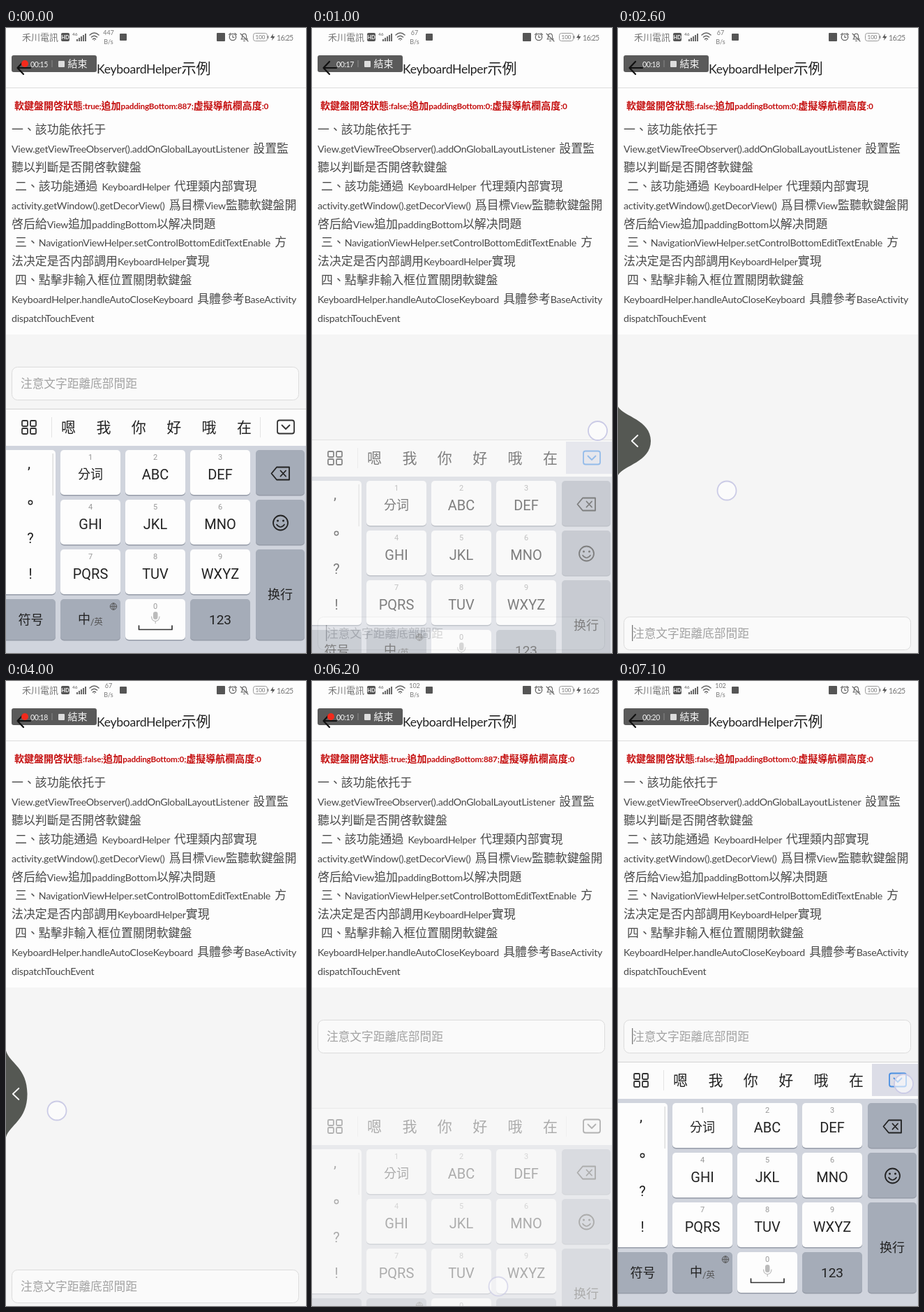
These frames come from a looping animation (430x893 px, 7200 ms). An HTML page:

```html
<!DOCTYPE html>
<html lang="zh-Hant">
<head>
<meta charset="utf-8">
<style>
  html, body { margin: 0; width: 100%; height: 100%; overflow: hidden; background: #f5f5f5; }
  svg { display: block; width: 430px; height: 893px; }
  text { font-family: Lato, "Noto Sans CJK TC", "Noto Sans CJK SC", "Noto Sans CJK JP", sans-serif; }
  .latin { font-size: .84em; letter-spacing: -.018em; word-spacing: .2em; }
  .key { font-family: Roboto, "Noto Sans CJK SC", "Noto Sans CJK JP", sans-serif; }
  .line { fill: none; stroke-linecap: round; stroke-linejoin: round; }
</style>
</head>
<body>
<svg id="stage" viewBox="0 0 430 893"></svg>
<script>
const LOOP = 7200, STEP = 100;
const INK = '#484848', GREY = '#777', KEY_GREY = '#a5acb8';

const text = (x, y, size, fill, content, attrs = '') =>
  `<text x="${x}" y="${y}" font-size="${size}" fill="${fill}" ${attrs}>${content}</text>`;
const centred = (x, y, size, fill, content, attrs = '') =>
  text(x, y + size * .36, size, fill, content, `text-anchor="middle" ${attrs}`);
const rect = (x, y, w, h, r, fill, attrs = '') =>
  `<rect x="${x}" y="${y}" width="${w}" height="${h}" rx="${r}" fill="${fill}" ${attrs}/>`;
const line = (d, stroke, width, attrs = '') =>
  `<path class="line" d="${d}" stroke="${stroke}" stroke-width="${width}" ${attrs}/>`;
const circle = (x, y, r, attrs) => `<circle cx="${x}" cy="${y}" r="${r}" ${attrs}/>`;
const mixed = s => s.replace(/[\x20-\x7e]+/g, '<tspan class="latin">$&</tspan>');

function statusBar() {
  const bars = [0, 1, 2, 3, 4].map(i => rect(101 + i * 3, 16 - i * 2, 2, 3 + i * 2, 0, '#666')).join('');
  return text(23, 18, 13, GREY, '禾川電訊')
    + rect(79, 7, 12, 12, 2, '#555') + centred(85, 13, 7.5, '#fff', 'HD', 'font-weight="700"')
    + text(95, 11, 6.5, '#555', '46') + bars
    + line('M120 10Q126.500 4 133 10M122.500 13Q126.500 9.500 130.500 13M124.500 16Q126.500 14 128.500 16', '#666', 1.6)
    + centred(126.5, 17.5, 3, '#666', '•')
    + `<text id="speed" x="147" y="10" font-size="9" fill="${GREY}" text-anchor="middle"></text>`
    + centred(147, 20, 9, GREY, 'B/s')
    + rect(163, 8, 10, 10, 1, '#555')
    + rect(302, 7, 12, 12, 1, '#555')
    + circle(325, 13, 4.7, 'fill="none" stroke="#666" stroke-width="1.300"')
    + line('M325 10.500V13.500H327M319.500 9.500L322 7.500M330.500 9.500L328 7.500', '#666', 1.2)
    + line('M337 16H346L344.500 14V11Q344 8 341.500 8T338.500 11V14ZM340.500 18.500H342.500M336 8L347 19', '#666', 1.1)
    + rect(354.5, 7.5, 20, 11, 3, 'none', 'stroke="#999"') + rect(375, 11, 1.5, 4, 0, '#999')
    + centred(364.5, 13, 8, GREY, '100')
    + '<path d="M383 8L379 14H382L381 18L385.500 12H382.500Z" fill="#555"/>'
    + text(388, 17.5, 10.5, GREY, '16:25', 'letter-spacing="-.7"');
}

function header() {
  return text(130, 65, 21, '#222', mixed('KeyboardHelper示例'))
    + rect(0, 85, 430, 1, 0, '#ddd')
    + rect(8, 39, 122, 24, 3, '#5a5a5a')
    + line('M35 57H17M25 48L16.500 57L25 66', '#111', 2.2, 'stroke-linecap="butt"')
    + circle(27, 51, 5, 'id="dot" fill="#f32a1c"')
    + '<text id="timer" x="35" y="55.500" font-size="10.500" fill="#f4f4f4" letter-spacing="-.4"></text>'
    + rect(65.5, 46, 1, 10, 0, '#888')
    + rect(75, 47, 9, 9, 1, '#ddd')
    + text(88.5, 56, 14, '#f4f4f4', '結束');
}

function article() {
  const lines = [
    '一、該功能依托于',
    'View.getViewTreeObserver().addOnGlobalLayoutListener 設置監',
    '聽以判斷是否開啓軟鍵盤',
    '二、該功能通過 KeyboardHelper 代理類内部實現',
    'activity.getWindow().getDecorView() 爲目標View監聽軟鍵盤開',
    '啓后給View追加paddingBottom以解决問題',
    '三、NavigationViewHelper.setControlBottomEditTextEnable 方',
    '法决定是否内部調用KeyboardHelper實現',
    '四、點擊非輸入框位置關閉軟鍵盤',
    'KeyboardHelper.handleAutoCloseKeyboard 具體參考BaseActivity',
    'dispatchTouchEvent'
  ];
  return '<text id="status" x="12" y="116" font-size="14" font-weight="700" fill="#c40d0d"></text>'
    + lines.map((s, i) =>
      text(/^[二三四]、/.test(s) ? 13 : 8, 151 + i * 26.9, 16.9, INK, mixed(s))).join('');
}

function field() {
  return '<g id="field">' + rect(8.5, 484.5, 411, 47, 8, '#fafafa', 'stroke="#dcdcdc"')
    + text(21, 514, 16.7, '#a2a2a2', '注意文字距離底部間距')
    + rect(20, 496, 1.3, 23, 0, '#777', 'id="cursor"') + '</g>';
}

function keyboard() {
  const label = (x, y, size, s, fill = '#222') => centred(x, y, size, fill, s, 'class="key"');
  const cap = (x, y, w, h, fill) =>
    rect(x, y + 1.5, w, h, 5, '#969ca8') + rect(x, y, w, h, 5, fill);
  const columns = [78, 171, 264], rows = [603, 674, 745];
  const names = ['分词', 'ABC', 'DEF', 'GHI', 'JKL', 'MNO', 'PQRS', 'TUV', 'WXYZ'];

  const bar = rect(0, 544, 430, 53, 0, '#fcfcfc') + rect(0, 544, 430, 1, 0, '#d4d4d4')
    + [23, 35].map(x => [561, 572].map(y =>
      rect(x, y, 8, 8, 1.5, 'none', 'stroke="#333" stroke-width="1.800"')).join('')).join('')
    + rect(65, 556, 1, 29, 0, '#e4e4e4') + rect(364, 556, 1, 29, 0, '#e4e4e4')
    + [...'嗯我你好哦在'].map((c, i) => centred(89.5 + i * 50.4, 570, 21, '#222', c)).join('')
    + rect(364, 547, 66, 46, 0, '#dcdde7', 'id="pressed"')
    + '<g id="collapse" stroke="#333">'
    + rect(389, 560.5, 24, 19, 3, 'none', 'stroke-width="1.800"')
    + '<path class="line" d="M395.500 567.500L401 573L406.500 567.500" stroke-width="1.800"/></g>';

  const letters = names.map((name, i) => {
    const x = columns[i % 3], y = rows[i / 3 | 0];
    return cap(x, y, 86, 64, '#fdfdfd') + label(x + 43, y + 10, 11, i + 1, '#999')
      + label(x + 43, y + 34.5, name === '分词' ? 18 : 20, name);
  }).join('');

  const punctuation = cap(-4, 603, 75, 206, '#fdfdfd') + rect(66.5, 608, 1.5, 60, 0, '#dedede')
    + text(31, 629, 21, '#222', ',', 'class="key"')
    + circle(35, 678, 2.7, 'fill="none" stroke="#222" stroke-width="1.400"')
    + label(35, 729, 20, '?') + label(35, 780, 20, '!');

  const side = cap(358, 603, 70, 64, KEY_GREY) + cap(358, 674, 70, 64, KEY_GREY)
    + cap(358, 745, 70, 129, KEY_GREY)
    + line('M380.500 636.500L388 627.500H406V645.500H388ZM393.500 632.500L401 640.500M401 632.500L393.500 640.500', '#222', 1.8)
    + circle(393.5, 707, 10.5, 'fill="none" stroke="#222" stroke-width="1.800"')
    + circle(389.5, 704, 1.5, 'fill="#222"') + circle(397.5, 704, 1.5, 'fill="#222"')
    + line('M388 709.500Q393.500 716.500 399 709.500', '#222', 1.7)
    + label(393, 810, 18, '换行');

  const bottom = cap(-4, 816, 75, 58, KEY_GREY) + label(35.5, 845.5, 18, '符号')
    + cap(78, 816, 86, 58, KEY_GREY) + label(112, 845, 18, '中') + label(130, 848, 12.5, '/英', '#555')
    + circle(154, 826.5, 4.7, 'fill="none" stroke="#555"')
    + line('M149.500 826.500H158.500M154 822V831M154 822Q149 826.500 154 831Q159 826.500 154 822', '#555', .8)
    + cap(171, 816, 86, 58, '#fdfdfd') + label(214, 826, 11, 0, '#999')
    + rect(211, 834, 6.5, 11, 3.2, '#bbb')
    + line('M208.500 841Q209 847.500 214.200 847.500T220 841M214.200 848V850.500', '#bbb', 1.2)
    + line('M190.500 854V859.500H238V854', '#333', 1.7)
    + cap(264, 816, 86, 58, KEY_GREY) + label(307, 845.5, 19, '123');

  return '<g id="keyboard">' + rect(0, 597, 430, 420, 0, '#d0d4dd')
    + bar + punctuation + letters + side + bottom + '</g>';
}

document.getElementById('stage').innerHTML =
  rect(0, 0, 430, 893, 0, '#f5f5f5') + rect(0, 0, 430, 438, 0, '#fdfdfd')
  + statusBar() + header() + article() + field() + keyboard()
  + '<g id="back"><path id="bulge" fill="#555853"/>'
  + line('', '#fff', 1.8, 'id="chevron"') + '</g>'
  + circle(0, 0, 13.5, 'id="touch" fill="#fff" fill-opacity=".6" stroke="#cbcbe6" stroke-width="1.800"');

const ui = {};
document.querySelectorAll('[id]').forEach(el => ui[el.id] = el);
const set = (el, attrs) => Object.entries(attrs).forEach(([k, v]) => el.setAttribute(k, v));
const show = (el, on) => set(el, { visibility: on ? 'visible' : 'hidden' });
const within = (t, ...spans) => spans.some(([a, b]) => t >= a && t < b);
const latest = (t, keys) => keys.filter(k => k[0] <= t).pop()[1];

// Linear interpolation through [time, value, ...] keys, held at both ends.
function track(t, keys) {
  const next = keys.findIndex(k => k[0] > t);
  if (next === 0) return keys[0].slice(1);
  if (next < 0) return keys[keys.length - 1].slice(1);
  const a = keys[next - 1], b = keys[next], p = (t - a[0]) / (b[0] - a[0]);
  return a.slice(1).map((v, i) => v + (b[i + 1] - v) * p);
}

const drag = [[1500, 2, 590], [2300, 160, 655], [2600, 156, 661], [4000, 73, 614], [5200, 5, 567]];
const fade = [[900, 1], [1000, .56], [1200, 0], [6000, 0], [6100, .06], [6200, .34], [6500, 1]];

function drawBack(x) {
  const w = 47 * Math.sin(Math.PI / 2 * Math.min(1, Math.max(0, (x - 5) / 151)));
  const h = 49 + (47 - w) * .78, cy = 590;
  const a = h * .71, b = h * .61;
  set(ui.bulge, {
    d: `M0 ${cy - h}C${w * .17} ${cy - a} ${w} ${cy - b} ${w} ${cy}`
      + `C${w} ${cy + b} ${w * .17} ${cy + a} 0 ${cy + h}Z`
  });
  const cx = w * .6 - 4.5;
  set(ui.chevron, { d: `M${cx + 4.5} ${cy - 8}L${cx - 4} ${cy}L${cx + 4.5} ${cy + 8}`, opacity: Math.min(1, w / 20) });
}

function draw(t) {
  const dragging = within(t, [1500, 5400]);
  const pressing = within(t, [700, 1400], [6900, LOOP]);
  const tapping = within(t, [5800, 6300]);
  const open = within(t, [0, 900], [6100, 7100]);
  const raised = within(t, [0, 1000], [6100, LOOP]);
  const recording = within(t, [0, 200], [500, 700], [1400, 2200], [3000, 4400], [5600, 6600]);

  ui.speed.textContent = latest(t, [[0, 447], [500, 67], [5800, 102]]);
  ui.timer.textContent = '00:' + latest(t, [[0, 15], [200, 16], [700, 17], [2200, 18], [4400, 19], [6600, 20]]);
  ui.status.innerHTML = mixed(`軟鍵盤開啓狀態:${open};追加paddingBottom:${open ? 887 : 0};虚擬導航欄高度:0`);
  show(ui.dot, recording);
  show(ui.cursor, !recording);
  set(ui.field, { transform: `translate(0 ${raised ? 0 : 357})` });

  const [alpha] = track(t, fade);
  set(ui.keyboard, { opacity: alpha, transform: `translate(0 ${100 * (1 - alpha)})` });
  show(ui.pressed, pressing);
  set(ui.collapse, { stroke: pressing ? '#4a90e2' : '#333' });

  const [x, y] = dragging ? track(t, drag) : pressing ? [409.5, 575.5] : [267, 865];
  show(ui.touch, dragging || pressing || tapping);
  set(ui.touch, { cx: x, cy: y, opacity: tapping ? .65 : 1 });
  show(ui.back, dragging);
  if (dragging) drawBack(x);
}

function tick() {
  draw(Math.floor(performance.now() % LOOP / STEP) * STEP);
  requestAnimationFrame(tick);
}
tick();
</script>
</body>
</html>
```
